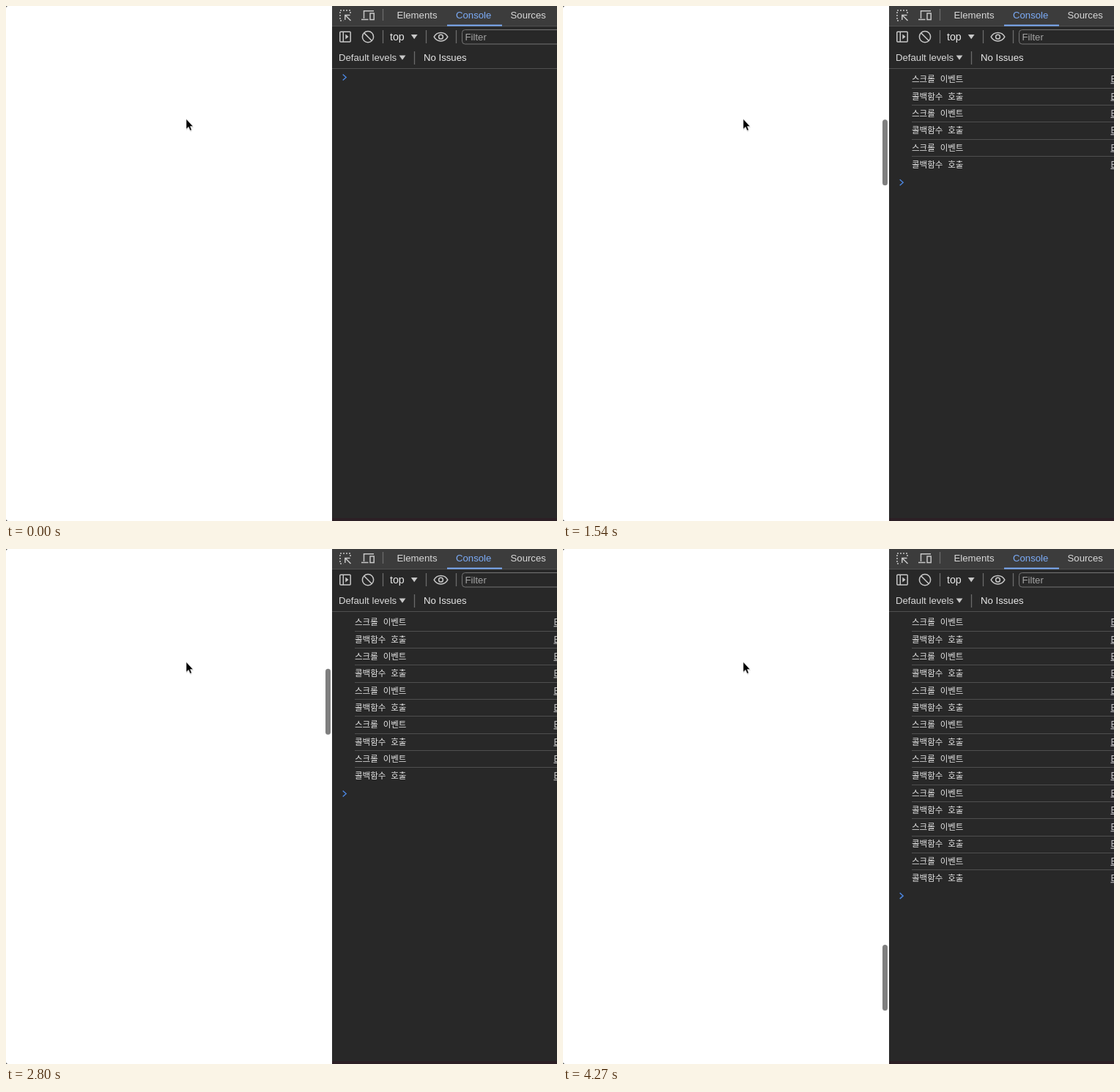
Animation, 752 px wide and 704 px high, one loop 4.34 s. Source, as an HTML page:

```html
<!DOCTYPE html>
<html lang="ko">
<head>
<meta charset="utf-8">
<title>Scroll throttle</title>
<style>
  html, body { margin: 0; width: 100%; height: 100%; overflow: hidden; background: #fff; }
  svg { display: block; width: 752px; height: 704px; }
  text { font: 13.2px "Liberation Sans", Arial, sans-serif; fill: #d9d9d9; white-space: pre; }
  .log { font: 11.5px "Noto Sans Mono", "Noto Sans CJK KR", "Noto Sans CJK JP", monospace; fill: #e3e3e3; }
  .link { font: 11.5px "DejaVu Sans Mono", monospace; fill: #c4c4c4; text-decoration: underline; }
  .icon { fill: none; stroke: #c7c7c7; stroke-width: 1.5; }
  .solid { fill: #c7c7c7; }
  .sep { stroke: #6b6b6b; stroke-width: 1.3; }
  .rule { stroke: #4f4f4f; stroke-width: 1; }
</style>
</head>
<body>
<svg viewBox="0 0 752 704">
  <rect width="752" height="704" fill="#fff"/>
  <path d="M0 0H2L0 2ZM0 704H2L0 702Z" fill="#555"/>

  <rect x="445" width="307" height="704" fill="#282828"/>
  <rect x="445" width="307" height="27" fill="#3c3c3c"/>
  <rect x="445" y="700" width="307" height="4" fill="#2c1f25"/>
  <path class="rule" d="M445 27.5H752M445 85.5H752"/>
  <rect x="602" y="25.5" width="75" height="2" fill="#7cacf8"/>
  <path class="sep" d="M514.5 4V20M514.5 33V51M573.5 33V51M614.5 33V51M557.5 62V80"/>

  <!-- tab bar -->
  <rect class="icon" x="456" y="6" width="14" height="14" stroke-dasharray="2 2" style="clip-path:polygon(-2px -2px,16px -2px,16px 5px,5px 5px,5px 16px,-2px 16px)"/>
  <path class="icon" d="M470.5 20L463.5 13M462.8 19V12.5H469.5"/>
  <path class="icon" d="M488.5 17V6.8H502M485 18.4H494.5"/>
  <rect class="icon" x="497" y="10" width="5.2" height="8.6"/>
  <text x="533.5" y="17">Elements</text>
  <text x="614" y="17" style="fill:#7cacf8">Console</text>
  <text x="688.5" y="17">Sources</text>

  <!-- console toolbar -->
  <rect class="icon" x="455.8" y="35.3" width="14.4" height="13.6" rx="1"/>
  <path class="icon" d="M460.3 35V49"/>
  <path class="solid" d="M463.3 38.6L467.5 42.1L463.3 45.6Z"/>
  <circle class="icon" cx="494" cy="42.2" r="7.6"/>
  <path class="icon" d="M488.7 36.9L499.3 47.5"/>
  <text x="524" y="47" style="font-size:14.2px;fill:#e8e8e8">top</text>
  <path class="solid" d="M552.8 39H561.6L557.2 45.2Z"/>
  <path class="icon" d="M584.2 42.2C588 34.6 599 34.6 602.8 42.2C599 49.8 588 49.8 584.2 42.2Z"/>
  <circle class="icon" cx="593.5" cy="42.2" r="2.9"/>
  <rect x="622.5" y="32.5" width="140" height="19.5" rx="4" fill="#282828" stroke="#757575"/>
  <text x="626.5" y="47" style="fill:#a3a3a3">Filter</text>
  <text x="454" y="75">Default levels</text>
  <path class="solid" d="M536.6 67.5H545.4L541 73.7Z"/>
  <text x="570" y="75" style="fill:#e8e8e8">No Issues</text>

  <g id="rows"></g>
  <path id="prompt" d="M459.7 -4L464.2 0L459.7 4" fill="none" stroke="#4c86e0" stroke-width="1.4"/>
  <rect id="thumb" x="436" width="7" height="90" rx="3.5" fill="#7f7f7f"/>

  <!-- pointer -->
  <g id="pointer" stroke-linejoin="round">
    <path d="M246 155.5V170L249.3 167L251.5 172L254 171L252 166.2H256.4Z" fill="#000" opacity=".13"/>
    <path d="M246 154.5V168.2L249.2 165.3L251.3 170.2L253.4 169.3L251.4 164.6H255.3Z" fill="#000" stroke="#fff" stroke-width=".5"/>
  </g>
</svg>
<script>
  const LOOP = 4340, STEP = 70, ROW = 23.33;
  const FIRST_CALL = 350, CALL_GAP = 510;
  const MESSAGES = ["스크롤 이벤트", "콜백함수 호출"];

  // [time, top of the scroll thumb]
  const SCROLL = [
    [70, 1], [560, 54], [910, 97], [1120, 128], [1500, 157], [1750, 131],
    [2065, 174], [2380, 127], [2690, 178], [3010, 126], [3080, 126],
    [3640, 295], [3850, 348], [4200, 526], [4270, 541]
  ];

  const $ = id => document.getElementById(id);
  const add = (parent, tag, attrs, text = "") => {
    const el = document.createElementNS("http://www.w3.org/2000/svg", tag);
    for (const key in attrs) el.setAttribute(key, attrs[key]);
    el.textContent = text;
    return parent.appendChild(el);
  };

  const rows = Array.from({ length: 16 }, (_, i) => {
    const row = add($("rows"), "g", {});
    const y = 100 + i * ROW;
    if (i) {
      const lineY = Math.round(y - 11.6) + 0.5;
      add(row, "path", { class: "rule", d: `M476 ${lineY}H752` });
    }
    add(row, "text", { class: "log", x: 476, y: y + 4.2 }, MESSAGES[i % 2]);
    add(row, "text", { class: "link", x: 747.5, y: y + 4.2 }, "E");
    return row;
  });

  // Monotone cubic: flat at turning points, smooth elsewhere
  const slope = i => (SCROLL[i + 1][1] - SCROLL[i][1]) / (SCROLL[i + 1][0] - SCROLL[i][0]);
  const tangent = i => {
    if (i === 0) return slope(0);
    if (i === SCROLL.length - 1) return slope(i - 1);
    const a = slope(i - 1), b = slope(i);
    return a * b <= 0 ? 0 : 2 * a * b / (a + b);
  };
  function thumbTop(t) {
    let i = 0;
    while (i < SCROLL.length - 2 && t > SCROLL[i + 1][0]) i++;
    const [t0, y0] = SCROLL[i], [t1, y1] = SCROLL[i + 1];
    const d = t1 - t0, u = (t - t0) / d, v = 1 - u;
    return y0 * v * v * (1 + 2 * u) + y1 * u * u * (3 - 2 * u)
      + d * u * v * (tangent(i) * v - tangent(i + 1) * u);
  }

  function draw(t) {
    const calls = Math.max(0, Math.floor((t - FIRST_CALL) / CALL_GAP) + 1);
    const count = calls * 2;
    rows.forEach((row, i) => row.setAttribute("visibility", i < count ? "visible" : "hidden"));
    const promptY = count ? 101.5 + count * 23.29 : 97.5;
    $("prompt").setAttribute("transform", `translate(0 ${promptY})`);
    $("thumb").setAttribute("visibility", t < STEP ? "hidden" : "visible");
    $("thumb").setAttribute("y", thumbTop(Math.max(t, STEP)));
  }

  const start = performance.now();
  function tick() {
    const t = (performance.now() - start) % LOOP;
    draw(Math.floor(t / STEP) * STEP);
    requestAnimationFrame(tick);
  }
  tick();
</script>
</body>
</html>
```
